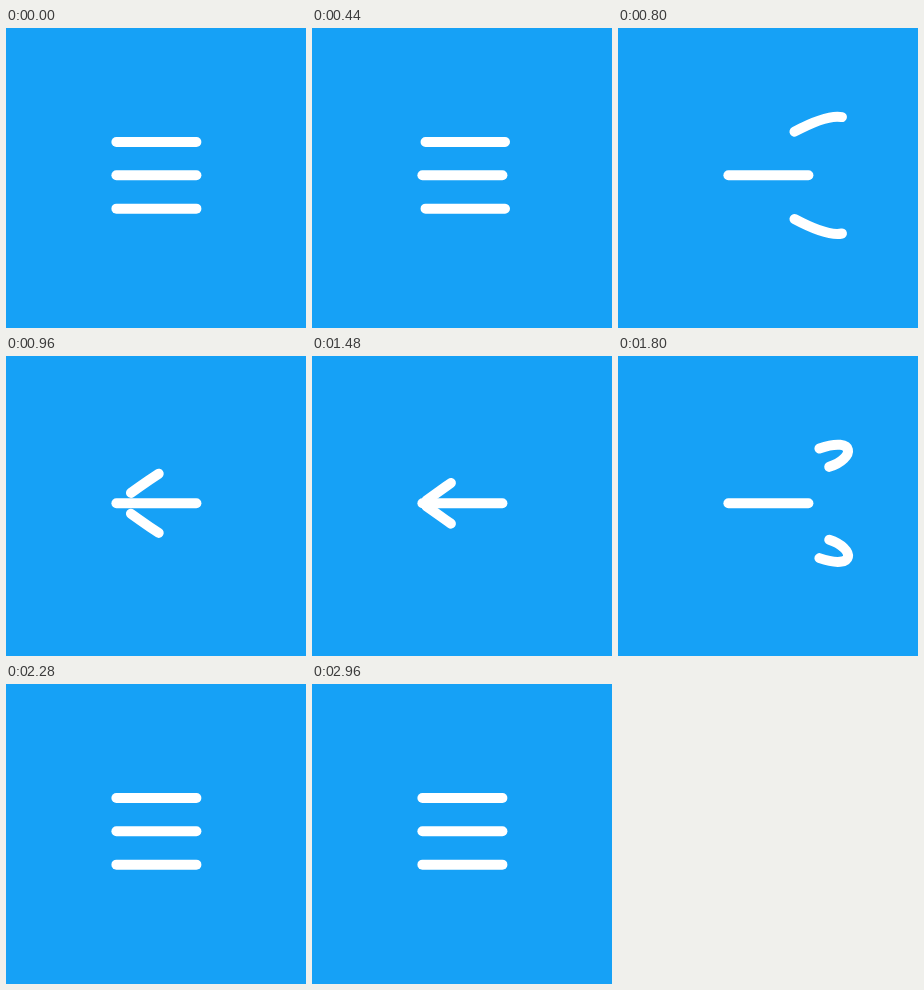
An HTML page for the animation above (3.88 s loop, 300x300 px).

```html
<!DOCTYPE html>
<html lang="en">
<head>
<meta charset="utf-8">
<title>Menu to back arrow</title>
<style>
  html, body { margin: 0; width: 100%; height: 100%; overflow: hidden; background: #16a1f6; }
  svg { display: block; width: 100%; height: 100%; }
  path { fill: none; stroke: #fff; stroke-width: 3; stroke-linecap: round; }
</style>
</head>
<body>
<svg viewBox="0 0 300 300">
  <g transform="translate(150.4 147.3) scale(3.3333) translate(-50 -50)">
    <path class="arm" d="M0 40h62c18 0 18-20-17 5L31 55"/>
    <path d="M38 50h24"/>
    <path class="arm" d="M0 60h62c18 0 18 20-17-5L31 45"/>
  </g>
</svg>
<script>
const LOOP = 3880;
const DURATION = 835;
const OPEN_AT = 366;
const CLOSE_AT = 1366;

// Visible stretch of each arm, measured along its path.
const MENU = { start: 38, length: 24 };
const ARROW = { start: 109.18, length: 8.602 };

const arms = document.querySelectorAll('.arm');

const clamp = v => Math.min(1, Math.max(0, v));
const mix = (a, b, p) => a + (b - a) * p;
const bezier = (a, b, s) => 3 * a * s * (1 - s) ** 2 + 3 * b * s * s * (1 - s) + s ** 3;

// cubic-bezier(.645, .045, .355, 1), solved by bisection
function ease(x) {
  if (x <= 0 || x >= 1) return clamp(x);
  let low = 0, high = 1;
  for (let i = 0; i < 24; i++) {
    const mid = (low + high) / 2;
    if (bezier(.645, .355, mid) < x) low = mid; else high = mid;
  }
  return bezier(.045, 1, low);
}

function render(time) {
  const t = time % LOOP;
  const progress = from => ease(clamp((t - from) / DURATION));
  const p = progress(OPEN_AT) - progress(CLOSE_AT);
  const start = mix(MENU.start, ARROW.start, p);
  const length = mix(MENU.length, ARROW.length, p);
  for (const arm of arms) {
    arm.style.strokeDasharray = `${length} 300`;
    arm.style.strokeDashoffset = -start;
  }
}

const origin = performance.now();
function tick() {
  render(performance.now() - origin);
  requestAnimationFrame(tick);
}
tick();
</script>
</body>
</html>
```
